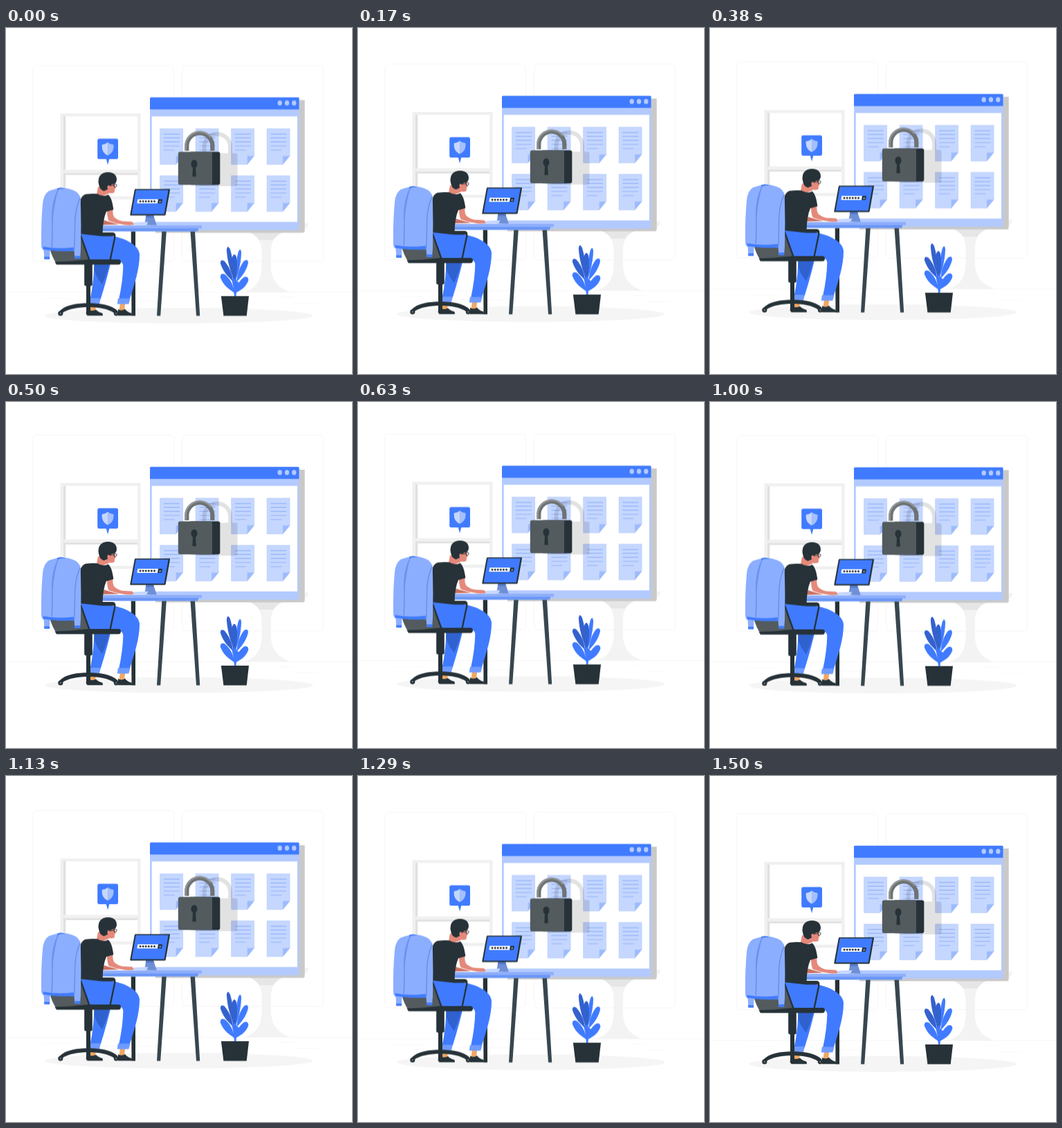
These frames come from a looping animation (500 px wide and 500 px high, 1.54 s). An HTML page:

```html
<!DOCTYPE html>
<html lang="en">
<head>
<meta charset="utf-8">
<title>Secure workspace</title>
<style>
  html, body { margin: 0; width: 100%; height: 100%; overflow: hidden; background: #fff; }
  svg { display: block; width: 100vw; height: 100vh; }
  .blue { fill: #407bff; }
  .pale { fill: #b3caff; }
  .dark { fill: #263238; }
  .slate { fill: #37474f; }
  .skin { fill: #e4897b; }
  .line { fill: none; stroke-linecap: round; stroke-linejoin: round; }
</style>
</head>
<body>
<svg viewBox="0 0 500 500">
  <g id="scene">
    <!-- room -->
    <g fill="none" stroke="#ebebeb" stroke-width=".45">
      <rect x="38.8" y="54.9" width="203.7" height="282.9" rx="5"/>
      <rect x="254.9" y="54.9" width="203.7" height="282.9" rx="5"/>
    </g>
    <g fill="#ebebeb">
      <rect y="382.2" width="500" height=".4"/>
      <rect x="416.8" y="398.5" width="33.1" height=".3"/>
      <rect x="396.6" y="389.2" width="19.2" height=".3"/>
      <rect x="52.5" y="390.9" width="43.2" height=".3"/>
      <rect x="131.5" y="395.1" width="93.7" height=".3"/>
    </g>

    <!-- shelf -->
    <path fill="#f0f0f0" fill-rule="evenodd" d="M78.5 124h116v124.3h-116zM86 128.2v77.2h104.2v-77.2zM86 210.3v33.4h104.2v-33.4z"/>
    <path fill="#e0e0e0" d="M83 128.2h3.3v77.2H83zM83 210.3h107.2v2.8H86.3v30.6H83z"/>

    <!-- pedestal table -->
    <path fill="#f3f3f3" d="M300 282.5H437.5Q436 291 427 292.5H402C390 300 383.5 308 383 322V345C383 366 395 377 411 382H345C361 377 369 366 369.500 345V322C369 308 362 300 350 292.500H300z"/>
    <path fill="#e6e6e6" d="M346 292.500H406C397 297 389 302 386 307H366C363 302 355 297 346 292.500z"/>

    <ellipse cx="250" cy="416.2" rx="193.9" ry="11.3" fill="#f5f5f5"/>

    <!-- board -->
    <path fill="#c9c9c9" d="M216 104.800H431.700V293.500Q431.700 296.500 428.500 296.500H216z"/>
    <rect class="pale" x="208" y="101" width="215.500" height="191.800" rx="1.500"/>
    <path class="blue" d="M208 118.300V102.300Q208 100.800 209.500 100.800H422Q423.500 100.800 423.500 102.300V118.300z"/>
    <rect x="210.700" y="128.300" width="210.300" height="152.500" fill="#fff"/>
    <g class="pale">
      <ellipse cx="395.700" cy="108.900" rx="3.200" ry="3.700"/>
      <ellipse cx="406" cy="108.900" rx="3.200" ry="3.700"/>
      <ellipse cx="416.300" cy="108.900" rx="3.200" ry="3.700"/>
    </g>
    <g id="docs"></g>

    <!-- padlock -->
    <g opacity=".11">
      <path d="M273 184.500q0-3 3-3H331.500q3 0 3 3V226q0 3-3 3H276q-3 0-3-3z"/>
      <path class="line" stroke="#000" stroke-width="6" stroke-linecap="butt" d="M286.500 181.500V172.500A18.700 18.700 0 0 1 324 172.500V181.500"/>
    </g>
    <path class="line" stroke="#6d7274" stroke-width="6.200" style="stroke-linecap:butt" d="M261.300 178V171A18.500 18.500 0 0 1 298.300 171V178"/>
    <path class="line" stroke="#929698" stroke-width="2.400" style="stroke-linecap:butt" d="M259.500 178V171A20.300 20.300 0 0 1 296 158.500"/>
    <rect class="dark" x="265" y="179.600" width="44.300" height="47.700" rx="3"/>
    <path fill="#535b5f" d="M248.800 182.600q0-3 3-3H296q2 0 2 2V225.300q0 2-2 2H251.800q-3 0-3-3z"/>
    <path class="dark" d="M272 191.300c2.700 0 4.500 2.500 4.500 5.700 0 2.300-1 4.200-2.500 5.200l.8 13.100h-5.400l.6-13.100c-1.500-1-2.500-2.900-2.500-5.200 0-3.200 1.800-5.700 4.500-5.700z"/>

    <!-- shield bubble -->
    <path class="blue" d="M134.700 160.500H159.500q2.500 0 2.500 2.500V187.500q0 2.500-2.500 2.500H149.300L147.100 198.300 144.800 190H134.700q-2.500 0-2.500-2.500V163q0-2.500 2.500-2.500z"/>
    <path fill="#c5d7ff" d="M147.100 165.800Q143.500 169 138.700 169.300C138.300 177 140.500 181.500 147.100 184.800z"/>
    <path fill="#a5c0fb" d="M147.100 165.800Q150.700 169 155.500 169.300C155.900 177 153.700 181.500 147.100 184.800z"/>

    <!-- plant -->
    <g id="leaves"></g>
    <path class="dark" d="M310.900 388H351L347.700 416.500H314.400z"/>

    <!-- desk -->
    <path class="dark" d="M180.700 294.500H187V416.500H181.500z"/>
    <path class="slate" d="M225.300 294.500H231.800L223.200 416.500H218zM266.500 294.500H273L280.200 416.500H275z"/>
    <path fill="#6a96f6" d="M130 289.800H278.500L277 294.600H130z"/>
    <rect x="130" y="285.800" width="153" height="4.400" fill="#8eaefb"/>

    <!-- monitor -->
    <path fill="#6e8fd6" d="M202.500 271H213L217.800 285.500H200z"/>
    <path fill="#5378ca" d="M202.500 271H213L214 274.500H201.800z"/>
    <path class="dark" d="M187.300 233.300H236.200Q237.300 233.300 237 234.600L230.700 270.200Q230.400 271.400 229.200 271.400H180.200Q179 271.400 179.300 270.200L185.800 234.600Q186 233.300 187.300 233.300z"/>
    <path class="blue" d="M187.700 234.800H234.600L228.600 269.500H181.500z"/>
    <path fill="#fff" d="M191 248H219.800L218.800 254H190Q189.300 254 189.500 253L190.200 248.700Q190.300 248 191 248z"/>
    <path class="dark" d="M220.300 248H225.300Q226 248 225.900 248.800L225.100 253.200Q225 254 224.200 254H219.300z"/>
    <path fill="#89a9ee" d="M221.700 250.400h2.300l-.4 2.200h-2.300z"/>
    <g id="dots" class="dark"></g>
    <path fill="#c5d7ff" d="M177 285.700L185.500 281.400 205.500 280.700 203 285.700z"/>

    <!-- far arm and far leg -->
    <path fill="#c96f63" d="M137 277L152 281.500 163 284.500 140 285z"/>
    <path class="blue" d="M121.500 393Q128 363 127.500 330L153 332Q147 360 136.500 393z"/>
    <path fill="#2f62cf" d="M127.500 336H150Q148 352 139 371Q131 362 127.300 350z"/>
    <path fill="#f0a765" d="M122.500 398H130.500L129 409H121.500z"/>
    <path class="dark" d="M117.500 407.500Q124 410.500 130 407.500Q133 411 139 412.500Q140.500 414 139.800 416.300H117.300z"/>
    <path fill="#6f9bff" d="M121.300 391H136.800L135 399H120.500z"/>

    <!-- near leg -->
    <path class="blue" d="M108 296C125 300 146 299 160 302.500C178 307 193 317 193 328C193 349 186 370 178.500 393H163Q169 366 169.300 344Q169 337.500 160 337L122 336Q110 328 108 296z"/>
    <path fill="#f0a765" d="M165 398H172.300L171 409H163.500z"/>
    <path class="dark" d="M162 407Q167 410 172 406.700Q175 411 181 412.500Q182.800 414 182 416.300H161.700z"/>
    <path fill="#6f9bff" d="M161.800 391.500H179.500L177.300 399.500H160.800z"/>

    <!-- torso, arm, head -->
    <path class="skin" d="M133 230L131 241 140 243.500 148 240 151 234z"/>
    <path class="skin" d="M146 262H154.500C154 269 155 272 157 274.500Q164 280 172 280L182 280.500Q185 282.500 184 285Q175 286 169 284.500Q158 283 149 279.500Q145.800 276 146 262z"/>
    <path class="dark" d="M115 240.800Q125 239.500 132 240.300Q141 245.500 147.500 241.500Q153 245 155.300 263L145 266Q140 277 139.500 298Q122 299.500 107.500 296Q104 262 108 248Q110.500 242 115 240.800z"/>
    <path class="skin" d="M147 223H157.300L158 230.500 158.300 232.800 157 233.300 156.800 237.500Q155.500 240.300 148 239L143 232z"/>
    <path class="dark" d="M134 218C136 210.500 143 208.500 149 209C157 209.700 161 215 159.800 221.500Q158.500 226.300 153.500 226.500Q149 228 149.500 232Q146 234.500 141.500 236.200Q135 234 134.200 227Q132.800 223 134 218z"/>
    <ellipse class="skin" cx="148.700" cy="230.700" rx="2.300" ry="2.900"/>
    <path class="line" stroke="#263238" stroke-width=".9" d="M149.500 228.500L156 227.800M156 226.300Q160.300 225.500 160.200 228Q159.500 231 157 230.500z"/>

    <!-- chair -->
    <path fill="#535b5f" d="M63 318Q61 300 75 296H106Q113 318 120.500 335.500V341H73Q66 331 63 318z"/>
    <path class="dark" d="M70.500 338.500Q92 338 119 335H162.500Q166 335 166 338.700T162.500 342.500H73z"/>
    <path class="line" stroke="#263238" stroke-width="2.300" d="M107 298L120.500 336M156.500 300Q158 302 156.500 307L150.500 336"/>
    <path class="dark" d="M107 293.500L140 296H153.500Q159 296 158.300 301.500H139L107 298z"/>
    <path class="dark" d="M113.200 342H124.800V371Q124.800 373.500 122 373.500H116Q113.200 373.500 113.200 371zM116 372H122V411H116z"/>
    <path class="dark" d="M76.500 410.500C86 400 104 398.300 119 398.300S152 400 161.500 409.500L157 413C148 406 133 404 119 404S90 406 80.500 413z"/>
    <g class="dark">
      <circle cx="78.800" cy="413" r="3.600"/>
      <circle cx="159.200" cy="413" r="3.400"/>
      <circle cx="119" cy="412.500" r="3.300"/>
    </g>
    <g fill="#6d7274">
      <circle cx="78.800" cy="413" r="1.300"/>
      <circle cx="159.200" cy="413" r="1.200"/>
    </g>

    <!-- jacket -->
    <path fill="#8caeff" d="M75 232.500Q86 230.500 96 234.500Q106 238 107.800 247Q109 285 108 321L107 333.500H99.500L98.500 322.500Q82 324 63.500 321L63 334.500H55.500L54.500 321.500Q51 320 51 314Q50.500 281 53 255Q54 241 62 236Q68 233.500 75 232.500z"/>
    <path class="blue" d="M53.500 316.500Q75 320.500 97.500 317.500L98.500 322.500Q78 324.500 53.700 320.500zM54.800 331.300H63.200L63 334.700H55.500zM99.200 330H107.600L107 333.800H99.500zM73.500 232.800Q78 229.500 87 233.300Q80 232.500 74.500 234.500z"/>
    <path class="line" stroke="#648ce6" stroke-width="1.300" d="M75.500 234Q66.500 252 66.800 275T66.300 317M106.800 247Q99.500 263 99.500 285T98.500 321"/>
    <path fill="#6c93ec" d="M75.500 234Q70 252 66.900 283Q64.800 254 75.500 234z"/>
  </g>
</svg>
<script>
const $ = id => document.getElementById(id);

// sheets of paper on the board
const paper = (x, y) => `<g transform="translate(${x} ${y})">
  <path fill="#c5d7ff" stroke="#acc5fa" stroke-width=".5" d="M0 0H33V39.500L23 51.700H0z"/>
  <path fill="#9dbbfc" d="M23 39.500H33L23 51.700z"/>
  <path stroke="#94b4fa" stroke-width="1.200" d="M5.300 7.800h23M5.300 13.300h23M5.300 19.200h23M5.300 25h23M5.300 31h16"/></g>`;
$('docs').innerHTML = [146, 214].flatMap(y =>
  [0, 1, 2, 3].map(i => paper(222.6 + i * 51.5, y))).join('');

$('dots').innerHTML = [0, 1, 2, 3, 4, 5].map(i =>
  `<circle cx="${194 + i * 4.1}" cy="251.1" r="1.5"/>`).join('');

// leaf: base point, tip point, half width, colour
const leaf = ([x, y, u, v, w, color]) => {
  const len = Math.hypot(u - x, v - y);
  const turn = Math.atan2(v - y, u - x) * 180 / Math.PI;
  return `<path fill="${color}" transform="translate(${x} ${y}) rotate(${turn})"
    d="M0 0C${len * .25} ${-w * .6} ${len * .5} ${-w * 1.5} ${len * .9} ${-w * .8}Q${len * 1.07} 0 ${len * .9} ${w * .8}C${len * .5} ${w * 1.5} ${len * .25} ${w * .6} 0 0z"/>`;
};
const deep = '#3362cf', blue = '#407bff';
$('leaves').innerHTML = [
  [329, 364, 320.5, 316, 3.2, deep],
  [332, 366, 338.5, 320, 2.8, blue],
  [329, 368, 311, 336, 4.2, deep],
  [333, 368, 348.5, 335.5, 4.2, blue],
  [330, 372, 330, 327, 3.8, deep],
  [331, 384, 311, 356, 5, blue],
  [331, 384, 349, 360.5, 5, blue]
].map(leaf).join('') +
  `<path fill="${blue}" d="M325.500 361Q330 367 331 360Q333 368 337 368Q333 377 332.500 388H330Q329 374 325.500 361z"/>`;

// the scene floats 10 px up and back, sampled 24 times a second
const loop = 1540, rise = 10, lead = 48, count = 37;
const float = t => {
  const p = (t + lead) % loop / loop;
  return -rise * (1 - Math.abs(1 - 2 * p));
};
const steps = Array.from({ length: count + 1 }, (_, i) => ({
  offset: i < count ? Math.round(i * 100 / 24) * 10 / loop : 1,
  transform: `translateY(${float(i % count * 1000 / 24).toFixed(3)}px)`,
  easing: 'steps(1, end)'
}));
$('scene').animate(steps, { duration: loop, iterations: Infinity });
</script>
</body>
</html>
```
